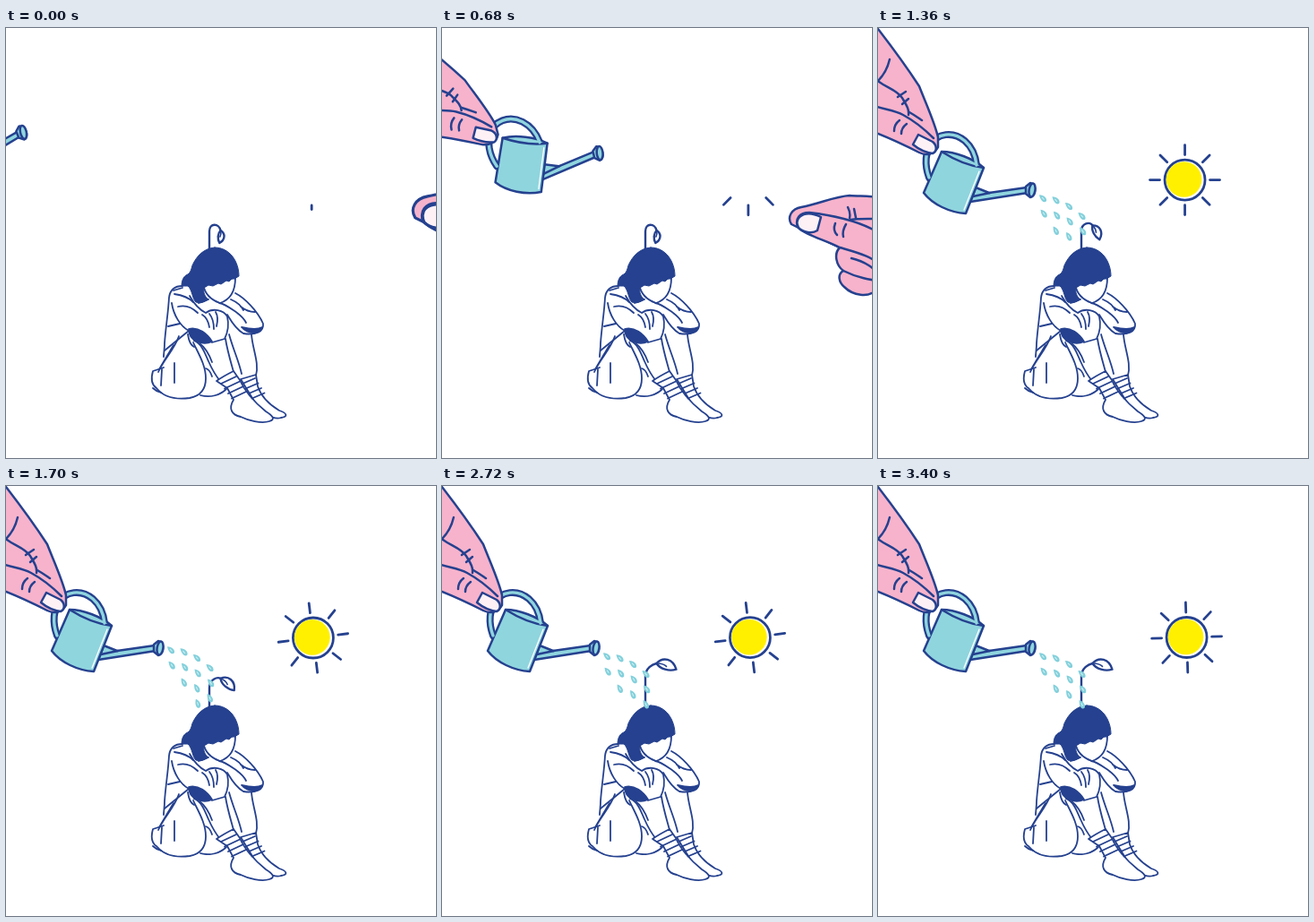
Write an HTML page that moves like this. It is 480 px wide and 480 px high and loops after 3.57 s.

```html
<!DOCTYPE html>
<html lang="en">
<head>
<meta charset="utf-8">
<title>Grow</title>
<style>
  html, body { margin: 0; width: 100%; height: 100%; overflow: hidden; background: #fff; }
  svg { display: block; width: 100vw; height: 100vh; }
  .line { fill: none; stroke: #25418f; stroke-linecap: round; stroke-linejoin: round; }
  .skin { fill: #f7b3cb; }
  .teal { fill: #8fd5de; }
  .white { fill: #fff; }
  .nail { fill: #fdf1f6; }
  .ink { fill: #25418f; }
  #leaf path { vector-effect: non-scaling-stroke; }
</style>
</head>
<body>
<svg viewBox="0 0 480 480">
  <defs>
    <path id="grip" d="M57 167C51 151 54 138 58 131C66 117 84 115 97 126C105 133 109 143 110 153"/>
  </defs>

  <g id="sun" class="line" stroke-width="2.8">
    <g id="rays"></g>
    <g id="disc">
      <circle r="22.5" class="white"/>
      <circle cx="-1" cy="-.6" r="19.8" fill="#fff000" stroke="none"/>
    </g>
  </g>

  <g class="line" stroke-width="2.4">
    <path id="stem"/>
    <g id="leaf">
      <path class="white" d="M0 0C.2 -.42 .7 -.45 1 0C.7 .2 .25 .22 0 0Z"/>
      <path stroke-width="1.6" d="M0 0Q.3 -.1 .5 0"/>
    </g>
  </g>

  <g class="line" stroke-width="1.8">
    <!-- body and shorts -->
    <path d="M197 288C188 288 183 293 182 301C181 319 178 336 177 352C177 359 176 363 176 367"/>
    <path d="M193 344C188 359 176 370 170 384M187 354C181 364 176 372 171 381"/>
    <path d="M176 379L164 383C162 390 162 398 168 402C176 412 190 415 205 413C216 411 223 404 223 391C223 376 214 362 209 351"/>
    <path d="M174 381L173 399M188 374V396M164 402C167 405 170 406 173 407"/>
    <path d="M217 410C228 413 239 410 246 403M223 380C227 381 229 386 230 389"/>
    <path d="M187 293L197 290M188 297C195 298 203 300 209 306"/>
    <!-- arms -->
    <path d="M185 307C187 321 195 333 204 338M177 360L204 338M194 330L181 333"/>
    <path d="M205 299C211 310 217 315 223 318C231 312 243 315 247 322C249 331 247 341 244 347L230 351"/>
    <path d="M192 311C200 309 208 312 214 318M215 307L226 303"/>
    <path d="M219 320C224 323 226 328 227 334M227 319C231 324 232 330 232 336M234 317C237 322 236 329 235 333"/>
    <path d="M256 296C266 301 281 316 287 330C288 339 279 343 265 341C256 336 250 325 247 320"/>
    <path d="M238 307C245 308 252 314 258 318C262 321 266 325 268 329M251 303C258 306 262 309 265 315M262 311C267 315 272 317 278 317"/>
    <path class="ink" d="M204 336C215 333 225 342 230 350C221 354 204 351 204 336ZM263 334C272 336 281 337 286 334C284 342 270 342 263 334Z"/>
    <!-- legs -->
    <path d="M203 342C204 349 206 354 210 356M210 349C219 353 222 363 226 372C230 381 234 388 239 394"/>
    <path d="M216 352C223 357 227 365 230 373M245 347C247 360 251 373 254 384"/>
    <path d="M249 342C254 360 260 372 263 386M274 342C275 358 283 374 279 388"/>
    <!-- socks -->
    <path class="white" d="M262 392L279 387L281 400C285 412 295 421 305 427C314 430 315 434 307 435C298 438 285 429 278 418Z"/>
    <path class="white" d="M235 394C242 389 248 386 254 383L261 393C267 407 279 419 290 428C298 433 301 437 294 439C285 442 270 438 262 434C252 432 248 425 254 415L247 402Z"/>
    <g id="ribs"></g>
    <!-- head -->
    <path class="white" d="M220 286C222 298 230 304 239 307C248 304 256 296 256 279Z"/>
    <path class="ink" stroke-width="1" d="M233 245C250 245 260 261 260 277L255 280L253 279L249 283L246 282L240 286L237 285L231 288L226 287L221 290C220 295 222 300 226 303C221 306 217 308 212 306C208 303 208 292 203 288L196 288C196 281 199 276 203 275C206 273 207 269 208 265C213 254 221 246 233 245Z"/>
  </g>

  <g id="pour" class="line" stroke-width="2.5">
    <!-- can -->
    <use href="#grip" stroke-width="8"/>
    <path class="teal" d="M109 178L124 184L166 178L167 184L103 194Z"/>
    <path d="M106 188L125 184"/>
    <path class="teal" d="M165 177L170 173C177 174 177 188 170 189L165 185Z"/>
    <ellipse class="teal" cx="172" cy="181" rx="3.4" ry="7.600" transform="rotate(9 172 181)"/>
    <path class="teal" d="M71 138C86 138 107 146 118 156L98 207C80 206 61 197 51 184Z"/>
    <path d="M71 138C82 145 100 154 118 156"/>
    <path stroke-width="1.3" style="stroke:#fff" d="M113 160L96 203"/>
    <use href="#grip" stroke-width="3.4" style="stroke:#8fd5de"/>
    <!-- hand -->
    <path class="skin" d="M-70 -95L0 1C17 23 33 45 46 65C53 83 64 107 67 122L67 133C63 141 54 143 46 139C30 131 15 124 0 118L-70 90Z"/>
    <path d="M13 35C10 48 5 55 -3 62M-4 56C8 67 20 68 27 78C31 85 35 90 34 97"/>
    <path d="M-12 84C4 91 17 91 28 97C41 104 52 113 62 123M35 94C42 98 46 101 49 103"/>
    <path d="M22 77L31 71M27 85L34 79M24 103C20 106 18 110 18 115M32 107C28 110 26 114 26 118"/>
    <path class="nail" d="M45 119L61 127C66 131 66 138 61 140C53 139 45 135 39 130Z"/>
  </g>

  <g id="drops"></g>

  <g id="pinch" class="line" stroke-width="2.5">
    <path class="skin" d="M388 236C381 243 384 256 392 262C385 266 387 275 393 280C403 290 420 292 428 284C440 298 459 317 480 333L570 400V290L482 214C473 196 461 184 440 182C428 178 414 179 399 178C382 179 366 187 345 191C334 193 329 202 334 210L342 214Z"/>
    <path d="M392 262C408 270 422 272 436 274M428 284C437 283 439 277 435 270M401 248C414 251 429 259 433 270"/>
    <path class="skin" d="M431 219C410 207 380 200 354 197C343 197 338 204 341 213C349 222 370 227 388 236C405 241 426 246 435 258"/>
    <path d="M383 209C381 214 382 219 385 222M395 210C392 215 391 220 392 224"/>
    <path d="M397 191C399 195 400 199 399 203M404 193L406 203M400 205C416 203 425 205 434 203M428 214C434 207 436 198 440 190M440 216C446 207 449 200 455 192M431 206C436 209 440 213 446 215M462 283C469 287 475 287 484 285"/>
    <path class="nail" d="M343 202C350 196 359 198 367 202L363 217C357 221 347 219 342 214C340 210 340 205 343 202Z"/>
  </g>
</svg>
<script>
const TICK = 170, STEPS = 21;
const ARRIVE = 2, TILTED = 6, SUNRISE = 8, GROWN = 16;

const $ = id => document.getElementById(id);
const clamp = v => Math.min(1, Math.max(0, v));
const set = (el, attrs) => {
  for (const key in attrs) el.setAttribute(key, attrs[key]);
  return el;
};
const add = (parent, tag, attrs) =>
  parent.appendChild(set(document.createElementNS('http://www.w3.org/2000/svg', tag), attrs));
const show = (el, on) => set(el, { visibility: on ? 'visible' : 'hidden' });

for (let i = 0; i < 4; i++) {
  add($('ribs'), 'path', { d: `M${240 + 4 * i} ${397 + 5.5 * i}l17 -8M${264 + 3.5 * i} ${397 + 5.5 * i}l14 -6` });
}

const rays = Array.from({ length: 8 }, (_, i) => {
  const up = Math.min(i, 8 - i);
  const el = add($('rays'), 'path', { transform: `rotate(${i * 45})` });
  return { el, bottom: up === 4, born: up < 4 ? 7 - up : 0 };
});

const drops = Array.from({ length: 16 }, (_, i) => {
  const el = add($('drops'), 'g', {});
  add(el, 'path', { d: 'M-2.500 -5C3 -3 4.500 2 2.500 4.500C0 6 -3.500 3 -2.500 -5Z', fill: '#82d0db' });
  add(el, 'path', { d: 'M-.6 -1.500L.8 2', stroke: '#c9edf1', 'stroke-width': 1.2 });
  return { el, col: i >> 2, row: i % 4 };
});

// slides in, then tips over around the thumb
function drawCan(s) {
  const k = clamp((s - ARRIVE) / (TILTED - ARRIVE));
  const tip = k ** 1.5;
  const x = 52 - 38 * (1 - k) ** 3 - 62.5 * Math.max(0, ARRIVE - s);
  set($('pour'), { transform: `translate(${x} ${114 + 16 * tip}) rotate(${22 * (tip - 1)}) translate(-52 -130)` });
}

// reaches in, leaves the rays behind and pulls back
function drawPinch(s) {
  const ahead = Math.max(0, ARRIVE - s);
  const back = Math.max(0, s - ARRIVE);
  const x = 331 + 61 * ahead + Math.max(0, back * 53 - 50);
  const y = 203 + 9 * clamp(back);
  set($('pinch'), { transform: `translate(${x} ${y}) scale(${1 + .13 * ahead}) translate(-331 -203)` });
  show($('pinch'), s < TILTED);
}

function drawPlant(s) {
  const left = 1 - clamp((s - TILTED) / (GROWN - TILTED));
  const bend = left ** 2.3;
  const y = 198 + 28 * left;
  const knee = y + 15 - 14 * bend;
  set($('stem'), { d: `M227 247V${knee}C227 ${knee - 10} ${235 + 3 * bend} ${y + 1 - 9 * bend} 239.500 ${y}` });
  set($('leaf'), { transform: `translate(239.500 ${y}) rotate(${17 + 78 * bend}) scale(${23 - 9 * bend})` });
}

function drawSun(s) {
  const sway = s > SUNRISE ? -3.5 * (1 + Math.cos((s - 10) * Math.PI / 3)) : 0;
  set($('sun'), { transform: `translate(${341.2 + .17 * s} ${170 - .05 * s})` });
  set($('rays'), { transform: `rotate(${sway})` });
  for (const { el, bottom, born } of rays) {
    set(el, { d: `M0 -28v${-(bottom ? Math.min(11, 4.5 + 2 * s) : 11)}` });
    show(el, s >= born);
  }
  show($('disc'), s >= SUNRISE);
}

// four columns that fan out and lengthen as the water spreads
function drawDrops(s) {
  const fall = (s + 2) % 4 * 3.5;
  for (const { el, col, row } of drops) {
    const y = 183 + 2.2 * col * col + 17 * row + fall;
    const wet = 14 * col + y - 184 <= 46 + 25 * (s - TILTED);
    show(el, s >= TILTED && wet && y <= Math.min(245, 208 + 22 * col));
    set(el, { transform: `translate(${184 + 14.5 * col + row % 2} ${y}) rotate(${8 * row - 20})` });
  }
}

const start = performance.now();
let last = -1;
function frame(now) {
  const s = Math.floor(Math.max(0, now - start) / TICK) % STEPS;
  if (s !== last) {
    for (const draw of [drawCan, drawPinch, drawPlant, drawSun, drawDrops]) draw(s);
    last = s;
  }
  requestAnimationFrame(frame);
}
frame(start);
</script>
</body>
</html>
```
